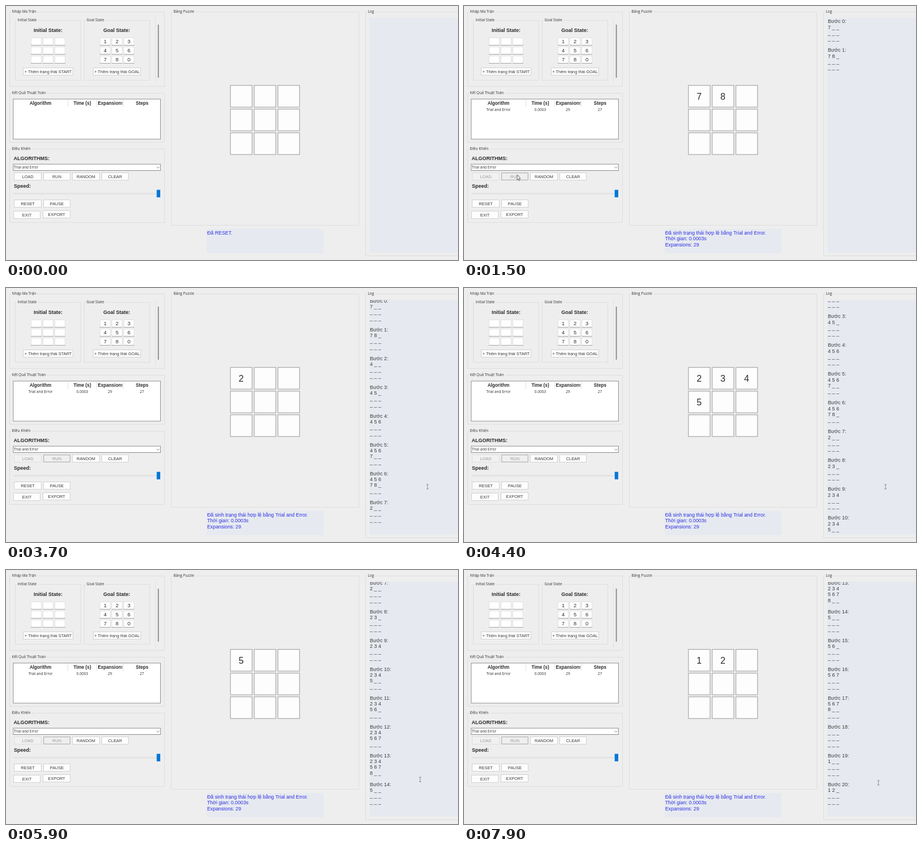
Recreate the animation shown at these times as an HTML page with a canvas. Size 800x450 px, loop 8000 ms.

```html
<!DOCTYPE html>
<html lang="vi">
<head>
<meta charset="utf-8">
<style>
html, body { margin: 0; width: 100%; height: 100%; overflow: hidden; background: #eee; }
canvas { display: block; }
</style>
</head>
<body>
<canvas id="stage" width="800" height="450"></canvas>
<script>
const c = document.getElementById('stage').getContext('2d');
const LOOP = 8000, FRAME = 100;
const LOAD_AT = 600, RUN_AT = 1050, STEP = 333;
const ARIAL = '"Liberation Sans", Arial, sans-serif';
const UI = '"Open Sans", "Noto Sans", sans-serif';
const PANEL = '#e6eaf0';

// Digits placed on the board after each step
const steps = ['7', '78', '4', '45', '456', '4567', '45678', '2', '23', '234', '2345',
  '23456', '234567', '2345678', '5', '56', '567', '5678', '', '1', '12', '123'];
// How far the log has caught up in the first moment of a step
const catchUp = { 10: .46, 13: .9 };

// Pointer path: time, x, y
const path = [[100, 50, 352], [500, 59, 308], [800, 59, 308], [1000, 97, 305], [1850, 97, 305],
  [2150, 330, 370], [2500, 794.5, 338], [2900, 794.5, 338], [3300, 745.5, 352], [4600, 745.5, 352],
  [5000, 732.5, 371], [6400, 732.5, 371], [6600, 733.5, 376], [7900, 733, 377]];

function box(x, y, w, h, fill, line, width = 1) {
  c.fillStyle = fill;
  c.fillRect(x, y, w, h);
  if (line) {
    c.strokeStyle = line;
    c.lineWidth = width;
    c.strokeRect(x + width / 2, y + width / 2, w - width, h - width);
  }
}

function text(s, x, y, size, { align = 'left', bold = false, font = ARIAL, color = '#2a2a2a' } = {}) {
  c.font = `${bold ? 'bold ' : ''}${size}px ${font}`;
  c.textAlign = align;
  c.fillStyle = color;
  c.fillText(s, x, y + size * .36);
}

function group(title, x, y, w, h) {
  box(x, y, w, h, '#eee', '#dedede');
  c.font = `6.5px ${UI}`;
  const width = c.measureText(title).width;
  c.fillStyle = '#eee';
  c.fillRect(x + 3, y - 2, width + 3, 5);
  text(title, x + 4.5, y, 6.5, { font: UI, color: '#333' });
}

function button(label, x, y, w, state) {
  const look = {
    active: ['#e2eefa', '#5f8cc0', '#333'],
    disabled: ['#f1f1f1', '#dedede', '#999'],
    focused: ['#efefef', '#b8b8b8', '#999']
  }[state] || ['#fdfdfd', '#d2d2d2', '#3a3a3a'];
  box(x, y, w, 14, look[0], look[1]);
  if (state === 'active' || state === 'focused') {
    c.strokeStyle = state === 'active' ? '#a6bfdb' : '#dcdcdc';
    c.strokeRect(x + 1.5, y + 1.5, w - 3, 11);
  }
  text(label, x + w / 2, y + 7.2, 7.4, { align: 'center', color: look[2] });
}

function matrix(x, digits) {
  for (let i = 0; i < 9; i++) {
    const cx = x + i % 3 * 21, cy = 56 + Math.floor(i / 3) * 16;
    box(cx, cy, 19, 14, '#fff', '#e2e2e2');
    c.fillStyle = '#a5a5a5';
    c.fillRect(cx, cy + 13, 19, 1);
    text(digits[i] || '', cx + 9.5, cy + 6.8, 9.3, { align: 'center' });
  }
}

function inputs() {
  group('Nhập Ma Trận', 6, 10, 275, 133);
  group('Initial State', 16, 25, 117, 107);
  group('Goal State', 138, 25, 117, 107);
  text('Initial State:', 74.5, 42.7, 9, { align: 'center', bold: true });
  text('Goal State:', 196, 42.7, 9, { align: 'center', bold: true });
  matrix(44, '');
  matrix(166, '123456780');
  button('+ Thêm trạng thái START', 30, 109, 89);
  button('+ Thêm trạng thái GOAL', 154, 109, 85);
  c.fillStyle = '#e2e2e2';
  c.fillRect(264, 20, 1, 117);
  c.fillStyle = '#7c7c7c';
  c.fillRect(268.8, 33, 1.6, 94);
}

function results(done) {
  group('Kết Quả Thuật Toán', 6, 154, 275, 88);
  box(12.3, 164.4, 261.6, 72, '#fff', '#8c8c8c');
  c.fillStyle = '#e2e2e2';
  for (const x of [109, 160, 207]) c.fillRect(x, 166, 1, 13);
  const head = { align: 'center', bold: true };
  text('Algorithm', 61, 171.7, 8.2, head);
  text('Time (s)', 135, 171.7, 8.2, head);
  text('Steps', 241, 171.7, 8.2, head);
  c.save();
  c.beginPath();
  c.rect(161, 165, 45, 14);
  c.clip();
  text('Expansions', 162.5, 171.7, 8.2, { bold: true });
  c.restore();
  if (!done) return;
  const row = [['Trial and Error', 61], ['0.0003', 135], ['29', 184], ['27', 240.5]];
  for (const [s, x] of row) text(s, x, 184, 6.5, { align: 'center', font: UI });
}

function controls(t) {
  const running = t >= RUN_AT;
  group('Điều Khiển', 6, 253, 275, 131);
  text('ALGORITHMS:', 13.5, 270, 9, { bold: true });
  box(12.3, 279.7, 261.6, 12.3, '#fff', '#8c8c8c');
  text('Trial and Error', 14, 286, 6.5, { font: UI });
  c.strokeStyle = '#666';
  c.lineWidth = .8;
  c.beginPath();
  c.moveTo(266.5, 284.8);
  c.lineTo(269, 287.3);
  c.lineTo(271.5, 284.8);
  c.stroke();
  button('LOAD', 14, 295, 49, running ? 'disabled' : t >= 500 && t < 1000 ? 'active' : '');
  button('RUN', 66, 295, 48, running ? 'focused' : t >= 1000 ? 'active' : '');
  button('RANDOM', 117, 295, 49);
  button('CLEAR', 169, 295, 48);
  text('Speed:', 14, 318.5, 9, { bold: true });
  box(13, 331, 260, 3, '#e4e4e4');
  box(266.7, 325.7, 6.3, 13.3, '#0078d7');
  button('RESET', 14, 343, 49);
  button('PAUSE', 66, 343, 48);
  button('EXIT', 13, 363, 48);
  button('EXPORT', 65, 362, 49);
}

function board(digits) {
  group('Bảng Puzzle', 292, 10, 333, 379);
  for (let i = 0; i < 9; i++) {
    const x = 396.6 + i % 3 * 42, y = 140 + Math.floor(i / 3) * 42;
    box(x, y, 39.6, 39.8, '#fdfdfd', '#acacac', 1.3);
    text(digits[i] || '', x + 19.7, y + 20, 16, { align: 'center' });
  }
}

function message(t) {
  box(355, 395, 207, 43, PANEL);
  const lines = t >= RUN_AT
    ? ['Đã sinh trạng thái hợp lệ bằng Trial and Error.', 'Thời gian: 0.0003s', 'Expansions: 29']
    : [t >= LOAD_AT ? 'Đã LOAD ma trận START và GOAL.' : 'Đã RESET.'];
  lines.forEach((s, i) => text(s, 356, 402 + i * 10.2, 8.8, { color: '#3030e2' }));
}

function log(n, fresh) {
  group('Log', 636, 10, 170, 433);
  box(643, 21, 157, 416, PANEL);
  const end = k => Math.max(0, 51 * k - 352.5);
  const scroll = fresh ? end(n - 1) + (end(n) - end(n - 1)) * (catchUp[n] || 0) : end(n);
  const ink = { color: '#3c3c3c' };
  c.save();
  c.beginPath();
  c.rect(643, 21.5, 157, 415.5);
  c.clip();
  for (let k = 0; k <= n; k++) {
    const y = 27.2 + 51 * k - scroll;
    text(`Bước ${k}:`, 644, y, 9, ink);
    const cells = steps[k].padEnd(9, '_');
    for (let r = 0; r < 3; r++)
      text([...cells.slice(r * 3, r * 3 + 3)].join(' '), 644, y + 10.2 * (r + 1), 9, ink);
  }
  c.restore();
}

function pointer(t) {
  if (t < path[0][0]) return;
  let i = path.findIndex(p => p[0] > t);
  if (i < 0) i = path.length - 1;
  const [t0, x0, y0] = path[i - 1], [t1, x1, y1] = path[i];
  const u = Math.min(1, (t - t0) / (t1 - t0)), e = u * u * (3 - 2 * u);
  const x = x0 + (x1 - x0) * e, y = y0 + (y1 - y0) * e;
  c.lineWidth = .8;
  c.beginPath();
  if (x > 643) {
    c.strokeStyle = '#777';
    for (const s of [-1, 1]) {
      c.moveTo(x - 1.5, y + 4 * s);
      c.lineTo(x + 2.5, y + 4 * s);
    }
    c.moveTo(x + .5, y - 4);
    c.lineTo(x + .5, y + 4);
  } else {
    const arrow = [[0, 0], [0, 9], [2, 7.2], [3.4, 10.3], [4.8, 9.7], [3.5, 6.6], [6, 6.4]];
    arrow.forEach(([dx, dy]) => c.lineTo(x - 3 + dx, y - 6 + dy));
    c.closePath();
    c.fillStyle = '#fff';
    c.fill();
    c.strokeStyle = '#444';
  }
  c.stroke();
}

function draw(now) {
  const t = Math.floor(now % LOOP / FRAME) * FRAME;
  const n = Math.floor((t - RUN_AT) / STEP);
  const fresh = n > 0 && t - RUN_AT - n * STEP < FRAME;
  box(0, 0, 800, 450, '#eee');
  inputs();
  results(t >= RUN_AT);
  controls(t);
  board(n < 0 ? '' : steps[n]);
  message(t);
  log(n, fresh);
  pointer(t);
}

const start = performance.now();
function tick() {
  draw(performance.now() - start);
  requestAnimationFrame(tick);
}
tick();
</script>
</body>
</html>
```
